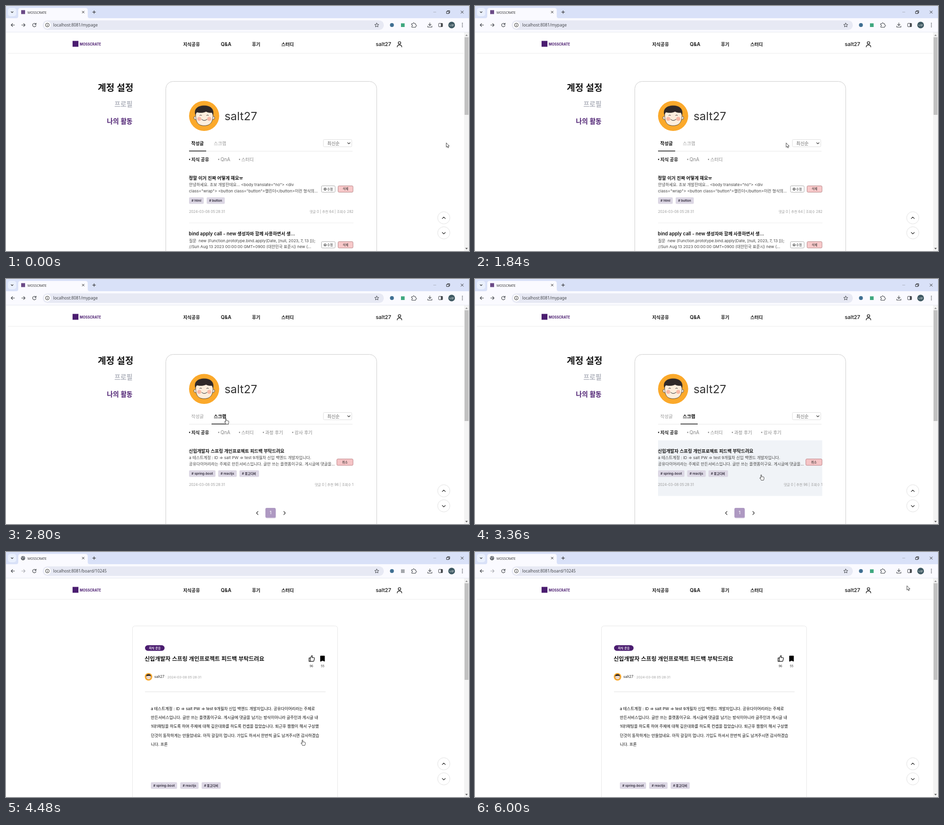
An HTML page for the animation above (6.08 s loop, 946 by 502 pixels).

```html
<!DOCTYPE html>
<html lang="ko">
<head>
<meta charset="utf-8">
<title>My page</title>
<style>
html, body { margin: 0; width: 100%; height: 100%; overflow: hidden; background: #fff; }
svg { display: block; }
text { white-space: pre; font-family: Inter, "Noto Sans CJK KR", "Noto Sans CJK", sans-serif; }
.ui { font-family: "Noto Sans", "Noto Sans CJK KR", sans-serif; }
</style>
</head>
<body>
<svg id="stage" width="946" height="502" viewBox="0 0 946 502"></svg>
<script>
const LOOP = 6080, SCRAP_AT = 2640, HOVER_AT = 3200, BOARD_AT = 4240;
const USER = 'salt27', SITE = 'MOSSCRATE';
const PURPLE = '#4b1d70', GREY = '#9a9a9a';

const esc = s => s.replace(/&/g, '&amp;').replace(/</g, '&lt;');

// Hangul runs are set at r times the Latin size.
function text(x, y, s, size, { w = 400, c = '#222', r = .945, a = 'start', cls = '' } = {}) {
  const body = esc(s).replace(/[ㄱ-힣]+/g, h => `<tspan font-size="${(size * r).toFixed(2)}">${h}</tspan>`);
  return `<text x="${x}" y="${y}" font-size="${size}" font-weight="${w}" fill="${c}" text-anchor="${a}" class="${cls}">${body}</text>`;
}
const box = (x, y, w, h, fill, r = 0, stroke = 'none', sw = 1) =>
  `<rect x="${x}" y="${y}" width="${w}" height="${h}" rx="${r}" fill="${fill}" stroke="${stroke}" stroke-width="${sw}"/>`;
const disc = (x, y, r, fill, stroke = 'none', sw = 1) =>
  `<circle cx="${x}" cy="${y}" r="${r}" fill="${fill}" stroke="${stroke}" stroke-width="${sw}"/>`;
const line = (d, c = '#333', w = 1, fill = 'none') =>
  `<path d="${d}" fill="${fill}" stroke="${c}" stroke-width="${w}" stroke-linecap="round" stroke-linejoin="round"/>`;
const rule = (x, y, w, c, h = 1) => box(x, y, w, h, c);
const group = (id, s) => `<g id="${id}">${s}</g>`;

function avatar(x, y, k) {
  return `<g transform="translate(${x} ${y}) scale(${k})">` +
    disc(0, 0, 30.8, '#fba92b') +
    disc(-17.5, 4, 3.5, '#fdeedd', '#333', .8) + disc(18, 4, 3.5, '#fdeedd', '#333', .8) +
    line('M-17-6C-18 11-14 20 0 20C14 20 19 11 18-6C10-12-10-12-17-6Z', '#333', .8, '#fdeedd') +
    line('M-18-3C-21-15-12-21 0-21C13-21 21-14 18-2L16-7C10-6 6-8 4-9C-2-6-10-6-15-8Z', '#2b2525', .6, '#2f2929') +
    disc(-10, 6, 4, '#f9b8a4') + disc(10.5, 6, 4, '#f9b8a4') +
    line('M-9-1Q-7-3-5-1M5-1Q7-3 9-1', '#333', 1) +
    line('M-5 7Q0 12 6 7', '#333', 1) + '</g>';
}

function tags(x, y, list) {
  return list.map(([dx, w, s]) =>
    box(x + dx, y, w, 13.5, '#dcd7e4', 2) + text(x + dx + 5, y + 9.2, s, 6.6, { w: 600, c: '#2d2838' })).join('');
}

function button(x, y, w, s, fill, stroke) {
  return box(x + .5, y + .5, w - 1, 13, fill, 2, stroke) +
    text(x + w / 2, y + 9.4, s, 6.7, { w: 500, a: 'middle' });
}

function chrome() {
  const ink = '#45484d';
  return box(0, 0, 946, 26, '#d9e1f8') + box(0, 25, 946, 29, '#fafaff') + rule(0, 53, 946, '#e6e8f0') +
    box(4, 4, 17, 17, '#eaf0fd', 5) + line('M10.5 11.7l2 2 2-2', '#222', 1.1) +
    line('M21 25Q25 25 25 21V9Q25 4 30 4H162Q167 4 167 9V21Q167 25 171 25Z', 'none', 0, '#fafaff') +
    text(44, 16, SITE, 6.8, { c: '#333', cls: 'ui' }) +
    line('M155.7 10.5l4 4m0-4l-4 4M177 12.5h6M180 9.5v6', '#222', 1) +
    line('M873.5 12.5h5', '#aab0bd', .9) +
    line('M900.5 11h4.5v4.5h-4.5zM902 11v-1.4h4.6v4.6H905M929.5 10l5 5m0-5l-5 5', '#222', .9) +
    line('M17.5 39h-7m3-3l-3 3 3 3', ink, 1.1) +
    `<path id="forward" d="M32 39h7m-3-3l3 3-3 3" fill="none" stroke-width="1.1" stroke-linecap="round"/>` +
    line('M60.6 36.8A3.5 3.5 0 1 0 61.3 40M61.5 35v2.6h-2.6', ink, 1.1) +
    box(75, 29.5, 697, 19.5, '#e7e9f4', 9.7) + disc(84.5, 39, 7, '#fff') +
    disc(84.5, 39, 3.8, 'none', '#333', 1) + line('M84.5 38.8v2M84.5 37.2v.1', '#333', 1) +
    `<text id="url" class="ui" x="96.5" y="42" font-size="8.3" fill="#44474c"></text>` +
    line('M757.5 35l1.2 2.7 3 .3-2.3 2 .7 2.9-2.6-1.5-2.6 1.5.7-2.9-2.3-2 3-.3z', ink, 1) +
    disc(788.5, 39, 4, '#3f6f92') +
    `<rect id="ext" x="807" y="35.5" width="7.5" height="7.5"/>` +
    line('M829 36.2h2.6q0-2 1.4-2t1.4 2h2.6v2.6q2 0 2 1.4t-2 1.4v2h-8v-2.2q1.8 0 1.8-1.4t-1.8-1.4z', ink, 1) +
    line('M866 34.5v5.5m-2.6-2.4l2.6 2.6 2.6-2.6M861.8 41v2.3h8.4V41', ink, 1.1) +
    box(884, 35.5, 8, 7, 'none', 1, ink, 1) + box(888.5, 35.5, 3.5, 7, ink) +
    disc(910.5, 39, 6.8, '#3b5660') + text(910.5, 41, '나루', 5.4, { c: '#fff', a: 'middle' }) +
    [35.5, 39, 42.5].map(y => disc(932.5, y, .9, ink)).join('');
}

function siteHeader() {
  const nav = [[362, '지식공유'], [439, 'Q&A'], [502.5, '후기'], [562.5, '스터디']];
  return box(136, 71.5, 12, 12, PURPLE) + text(150.5, 80.7, SITE, 6.9, { w: 700, c: PURPLE }) +
    nav.map(([x, s]) => text(x, 81.8, s, 9.85, { w: 600, c: '#111' })).join('') +
    text(787, 81.8, USER, 10.85, { w: 500, c: '#111', a: 'end' }) +
    disc(804, 75.6, 2.6, 'none', '#111', 1.2) +
    line('M799.3 84Q799.3 79.8 804 79.8T808.7 84', '#111', 1.2) +
    rule(4, 96.5, 932, '#eeeeee');
}

function floating() {
  return disc(894.5, 434, 12.5, '#fff', '#dedede', .9) + line('M891.3 435.6l3.2-3.2 3.2 3.2', '#222', 1.1) +
    disc(894.5, 464.8, 12.5, '#fff', '#dedede', .9) + line('M891.3 463.8l3.2 3.2 3.2-3.2', '#222', 1.1) +
    box(936, 54, 10, 448, '#f3f3f3') +
    `<rect id="thumb" x="937" y="64" width="8" fill="#c1c1c1"/>` +
    line('M939 61l2-2.4 2 2.4z', '#8a8a8a', .4, '#8a8a8a') + line('M939 496l2 2.4 2-2.4z', '#505050', .4, '#505050');
}

function account() {
  return text(187.5, 174, '계정 설정', 19.6, { w: 700, c: '#151515' }) +
    text(258.5, 206, '프로필', 14.2, { w: 600, c: '#b4b7c0', a: 'end' }) +
    text(258.5, 240.8, '나의 활동', 14, { w: 600, c: PURPLE, a: 'end' }) +
    box(326.5, 154.5, 431, 400, '#fff', 15, '#cfcfcf') +
    avatar(404.8, 225.2, 1) + text(446.5, 234, USER, 23.4, { c: '#333' }) +
    rule(374, 297, 334, '#e9e9e9') +
    box(648.5, 273.5, 58, 15, '#fff', 2, '#dddddd', .9) +
    text(656.5, 284.6, '최신순', 9.7, { c: '#666' }) + line('M698 280l2.5 2.5 2.5-2.5', '#444', 1.1);
}

function tabs(active, subs) {
  const main = [[378.5, 374, '작성글'], [424.5, 420, '스크랩']];
  return main.map(([x, bx, s], i) => i === active
    ? text(x, 285.2, s, 9.85, { w: 600, c: '#111' }) + rule(bx, 296.4, 35, '#222', 1.5)
    : text(x, 285.2, s, 9.85, { c: GREY })).join('') +
    subs.map(([x, s], i) => {
      const c = i ? '#858585' : '#111';
      return box(x, 313.2, 2.2, 2.2, c) + text(x + 4.8, 317.6, s, 9.7, { w: i ? 400 : 600, c });
    }).join('');
}
const subs = [[374, '지식 공유'], [433.5, 'QnA'], [476, '스터디'], [524.8, '과정 후기'], [584.8, '강사 후기']];

function post(y, title, lines) {
  return text(373.6, y, title, 9.7, { w: 600, c: '#111' }) +
    lines.map((s, i) => text(374, y + 13.8 + i * 12.5, s, 8.16, { c: '#444', r: 1 })).join('');
}
function meta(stats) {
  return text(374, 424.2, '2024-03-08 05:28:31', 7.15, { c: GREY }) +
    text(710, 424.2, stats, 7.2, { c: GREY, a: 'end' });
}
function editButtons(y) {
  return box(644.5, y + .5, 28, 13, '#fff', 2, '#a5a5a5', .9) +
    disc(652, y + 7.2, 2, 'none', '#333', 1.2) + text(656, y + 9.6, '수정', 6.9, { w: 500 }) +
    button(678, y, 31.5, '삭제', '#f8c9ca', '#b9898b');
}

const posts = () => tabs(0, subs.slice(0, 3)) +
  post(355.6, '정말 이거 진짜 어떻게 해요ㅠ', [
    '안녕하세요. 초보 개발잔데요... <body translate="no"> <div',
    'class="wrap"> <button class="button">캘린더</button>이런 형식의...']) +
  editButtons(368) +
  tags(374, 392, [[0, 30, '# html'], [36, 37, '# button']]) +
  meta('댓글 0 | 추천 64 | 조회수 282') + rule(374, 444, 336, '#eeeeee') +
  post(470, 'bind apply call - new 생성자와 함께 사용하면서 생...', [
    '질문  new (Function.prototype.bind.apply(Date, [null, 2023, 7, 13 ]));',
    '//Sun Aug 13 2023 00:00:00 GMT+0900 (대한민국 표준시) new (...']) +
  editButtons(482.3);

const TITLE = '신입개발자 스프링 개인프로젝트 피드백 부탁드려요';
const INTRO = 'a 테스트계정 : ID ⇒ salt PW ⇒ test 9개월차 신입 백엔드 개발자입니다.';

const scrap = () => `<rect id="hover" x="374" y="330.5" width="335.5" height="114" fill="#f0f3f7"/>` +
  tabs(1, subs) +
  post(355.6, TITLE, [INTRO, '공유다이어리라는 주제로 만든서비스입니다. 글만 쓰는 플랫폼이구요. 게시글에 댓글을...']) +
  button(675.5, 368.3, 34, '취소', '#f5c4c6', '#c08589') +
  tags(374, 392, [[0, 54, '# spring-boot'], [59.5, 38, '# reactjs'], [103, 40, '# 몽고디비']]) +
  meta('댓글 0 | 추천 96 | 조회수 1') +
  line('M515 476.2l-3.2 3.3 3.2 3.3M567.5 476.2l3.2 3.3-3.2 3.3', '#333', 1.2) +
  box(530.5, 470.5, 21, 20, '#ddd5e5', 3) + box(530, 469, 21, 20, '#ae99c2', 2.5) +
  text(540.5, 482.2, '1', 8.6, { w: 500, c: '#fff', a: 'middle' });

function board() {
  const body = [
    INTRO + ' 공유다이어리라는 주제로',
    '만든서비스입니다. 글만 쓰는 플랫폼이구요. 게시글에 댓글을 남기는 방식이아니라 글주인과 게시글 내',
    '1대1채팅을 하도록 하여 주제에 대해 깊은대화를 하도록 컨셉을 잡았습니다. 퇴근후 짬짬이 해서 구상했',
    '던것이 동작하게는 만들었네요. 아직 갈길이 멉니다. 가입도 하셔서 한번씩 글도 남겨주시면 감사하겠습',
    '니다. 프론'];
  return box(258.5, 151.5, 419, 400, '#fff', 5, '#e8e8e8') +
    box(284, 191, 40, 11.5, PURPLE, 5.7) + text(304, 198.9, '지식 공유', 6.4, { w: 600, c: '#fff', a: 'middle' }) +
    text(283.3, 222.8, TITLE, 12.15, { w: 600, c: '#111' }) +
    line('M619.2 217.2h2.6v7h-2.6zM621.8 217.5l2.9-5.2q1.7.2 1.2 2l-.6 2.2h4q1.3.3 1 1.7l-1.3 5q-.4 1-1.4 1h-5.8', '#111', 1.2) +
    line('M642.9 213h8v11l-4-1.8-4 1.8z', '#000', 1, '#000') +
    text(624, 236.2, '96', 6.2, { c: '#333', a: 'middle' }) + text(647, 236.2, '55', 6.2, { c: '#333', a: 'middle' }) +
    avatar(291.2, 255.7, .25) + text(303, 258.3, USER, 7.2, { c: '#222' }) +
    text(325.3, 258.3, '·', 7, { c: GREY }) + text(329.8, 258.5, '2024-03-08 05:28:31', 6.75, { c: '#a0a0a0' }) +
    rule(284, 286, 369, '#e2e2e2') +
    body.map((s, i) => text(296, +(323.5 + i * 18.45).toFixed(2), s, 8.14, { c: '#0a0a0a', r: 1 })).join('') +
    tags(296, 471.8, [[0, 53.5, '# spring-boot'], [60, 37.5, '# reactjs'], [103.7, 39, '# 몽고디비']]);
}

const favicons = () => group('siteIcon', box(31, 8.5, 8, 8, '#6b4a86')) +
  group('globe', disc(34.8, 12.6, 4.4, '#5f6368') +
    line('M31.6 11.2l2.4 1 .4 2.4M35 8.8l.4 2 2.6 1.6', '#d9dce2', 1));

const cursors = () =>
  group('arrow', line('M0 0V8.4L2 6.7 3.4 9.9 4.8 9.3 3.4 6.2H6Z', '#222', .8, '#fff')) +
  group('hand', line('M-.8 7V1Q0-.4.9 1V4.6Q2 3.6 2.6 4.7 3.8 4 4.2 5 5.6 4.5 5.8 6V8.2Q5.7 9.6 4.9 11.6H0Q-.4 10.4-1 9.6L-3 7Q-2.6 5.7-.8 7Z',
    '#222', .8, '#fff'));

const stage = document.getElementById('stage');
stage.innerHTML = box(0, 0, 946, 502, '#fff') + siteHeader() +
  group('account', account()) + group('posts', posts()) + group('scrap', scrap()) + group('board', board()) +
  floating() + chrome() + favicons() + cursors();

const $ = id => document.getElementById(id);
const show = (id, on) => $(id).setAttribute('display', on ? 'inline' : 'none');

// time, x, y of the pointer tip
const path = [
  [0, 899.5, 280.8], [720, 899.5, 280.8], [1200, 882.5, 274.5], [1360, 882.5, 274.5],
  [2240, 449.3, 285.8], [2960, 449.3, 285.8], [3360, 584.7, 400.7], [3520, 584.7, 400.7],
  [3840, 605.7, 384.7], [4960, 605.7, 384.7], [5840, 882.5, 69.5], [LOOP, 882.5, 69.5]];

function pointer(t) {
  const i = path.findIndex(p => p[0] > t);
  const [t0, x0, y0] = path[i - 1], [t1, x1, y1] = path[i];
  const u = (t - t0) / (t1 - t0), e = u * u * (3 - 2 * u);
  return [x0 + (x1 - x0) * e, y0 + (y1 - y0) * e];
}

function draw(t) {
  const onBoard = t >= BOARD_AT, onScrap = !onBoard && t >= SCRAP_AT;
  show('account', !onBoard);
  show('posts', !onBoard && !onScrap);
  show('scrap', onScrap);
  show('hover', t >= HOVER_AT);
  show('board', onBoard);
  show('siteIcon', !onBoard);
  show('globe', onBoard);
  $('url').textContent = 'localhost:8081/' + (onBoard ? 'board/10245' : 'mypage');
  $('forward').setAttribute('stroke', onBoard ? '#a9abb1' : '#45484d');
  // the extension wakes up again once the new page has settled
  $('ext').setAttribute('fill', t >= BOARD_AT && t < 4960 ? '#a3a6ab' : '#3fa77f');
  $('thumb').setAttribute('height', onBoard ? 198 : onScrap ? 227 : 159);
  const hand = (t >= 2160 && t < 3000) || (t >= HOVER_AT && t < 5040);
  show('hand', hand);
  show('arrow', !hand);
  const [x, y] = pointer(t);
  $(hand ? 'hand' : 'arrow').setAttribute('transform', `translate(${x.toFixed(2)} ${y.toFixed(2)})`);
}

const start = performance.now();
function tick() {
  draw((performance.now() - start) % LOOP);
  requestAnimationFrame(tick);
}
tick();
</script>
</body>
</html>
```
